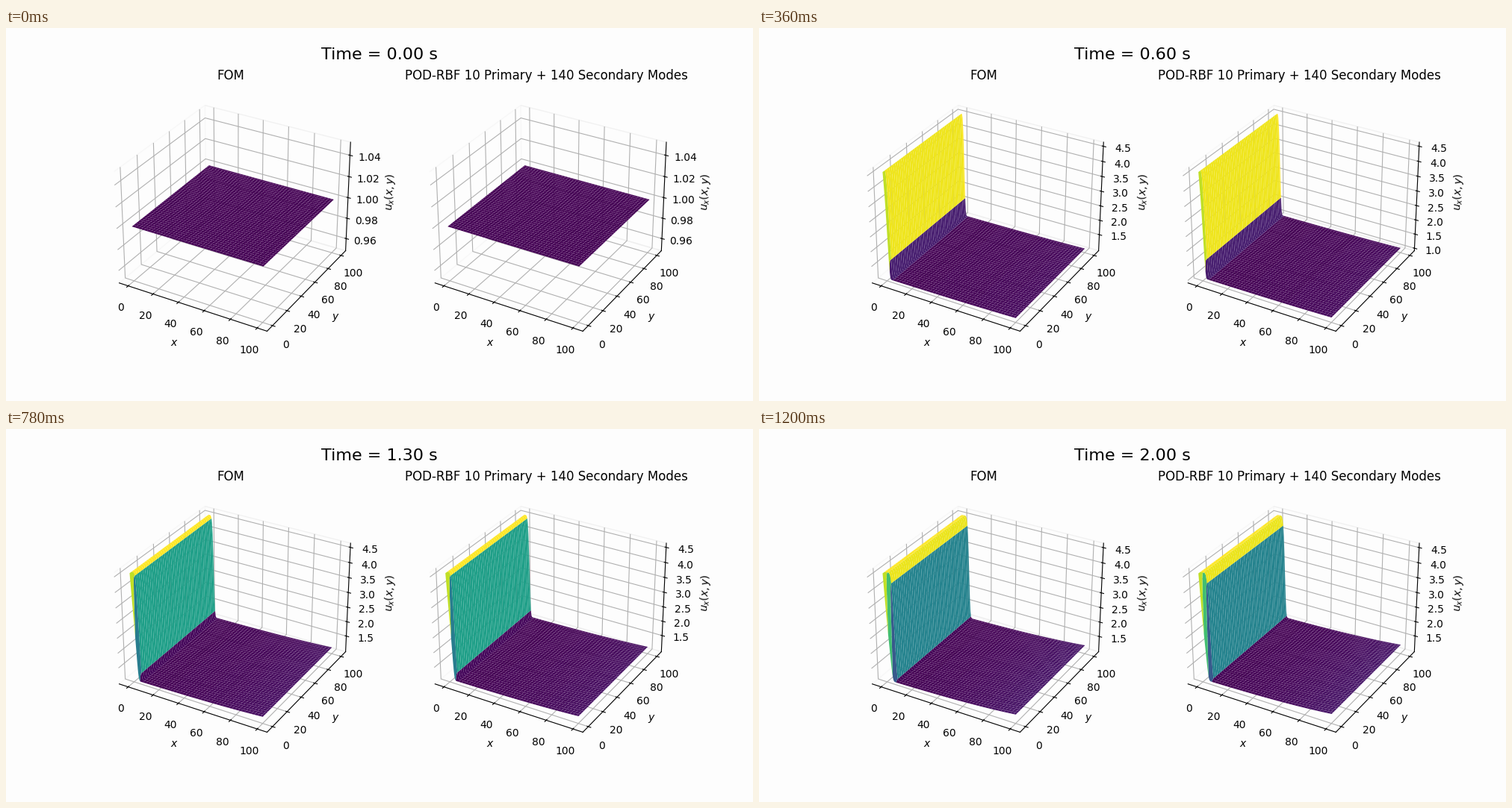
Recreate the animation shown at these times as a matplotlib script. Size 1000 by 500 pixels, loop 1230 ms.

```python
import numpy as np
import matplotlib.pyplot as plt
from matplotlib.animation import FuncAnimation

STEPS = 41
DT = 0.05
LENGTH = 100
NODES = 251
INFLOW = 4.56
SOURCE_RATE = 0.019
DATA_MARGIN = 0.05
VIEW_MARGIN = 1 / 48

x = np.linspace(0, LENGTH, NODES)
X, Y = np.meshgrid(x, x)


def solve_burgers():
    """Upwind Burgers solution, implicit along x, with unit drift along y."""
    c = DT / (x[1] - x[0]) / 2
    source = DT * 0.02 * np.exp(SOURCE_RATE * x)
    history = [np.ones((NODES, NODES))]
    for step in range(1, STEPS):
        prev = history[-1]
        undisturbed = 1 + (step - 1) * source
        below = np.vstack([undisturbed, prev[:-1]])
        known = prev + source - c * (prev - below)
        u = np.empty_like(prev)
        u[:, 0] = INFLOW
        for i in range(1, NODES):
            rhs = known[:, i] + c * u[:, i - 1] ** 2
            u[:, i] = (np.sqrt(1 + 4 * c * rhs) - 1) / (2 * c)
        history.append(u)
    return history


def padded(low, high, margin=VIEW_MARGIN):
    pad = (high - low) * margin
    return low - pad, high + pad


fields = solve_burgers()
plane_limits = padded(*padded(0, LENGTH, DATA_MARGIN))

fig, axes = plt.subplots(1, 2, figsize=(10, 5), dpi=100,
                         subplot_kw={"projection": "3d"})
fig.set_facecolor("#fdfdfd")
heading = fig.suptitle("", fontsize=16, y=0.948)

titles = ("FOM", "POD-RBF 10 Primary + 140 Secondary Modes")
undershoots = (0.006, 0.027)
surfaces = [None, None]

for ax, title in zip(axes, titles):
    ax.set_facecolor("none")
    ax.set_title(title, pad=5.1)
    ax.set_xlabel("$x$")
    ax.set_ylabel("$y$")
    ax.set_zlabel("$u_x(x,y)$")
    for axis in (ax.xaxis, ax.yaxis, ax.zaxis):
        axis.pane.fill = False


def set_height_axis(ax, u, undershoot, step):
    if step == 0:
        low, high = 0.95, 1.05
        ticks = np.arange(0.96, 1.05, 0.02)
    else:
        low, high = u.min() - undershoot, u.max()
        ticks = np.arange(1.0 if low <= 1 else 1.5, high, 0.5)
    ax.set_zlim(*padded(low, high))
    ax.set_zticks(ticks)


def update(step):
    u = fields[step]
    heading.set_text(f"Time = {step * DT:.2f} s")
    for k, ax in enumerate(axes):
        if surfaces[k] is not None:
            surfaces[k].remove()
        surfaces[k] = ax.plot_surface(X, Y, u, cmap="viridis")
        ax.set_xlim(*plane_limits)
        ax.set_ylim(*plane_limits)
        ax.set_xticks(range(0, LENGTH + 1, 20))
        ax.set_yticks(range(0, LENGTH + 1, 20))
        set_height_axis(ax, u, undershoots[k], step)
    return surfaces


anim = FuncAnimation(fig, update, frames=STEPS, interval=30,
                     init_func=lambda: update(0), repeat=True, blit=False)
plt.show()
```
